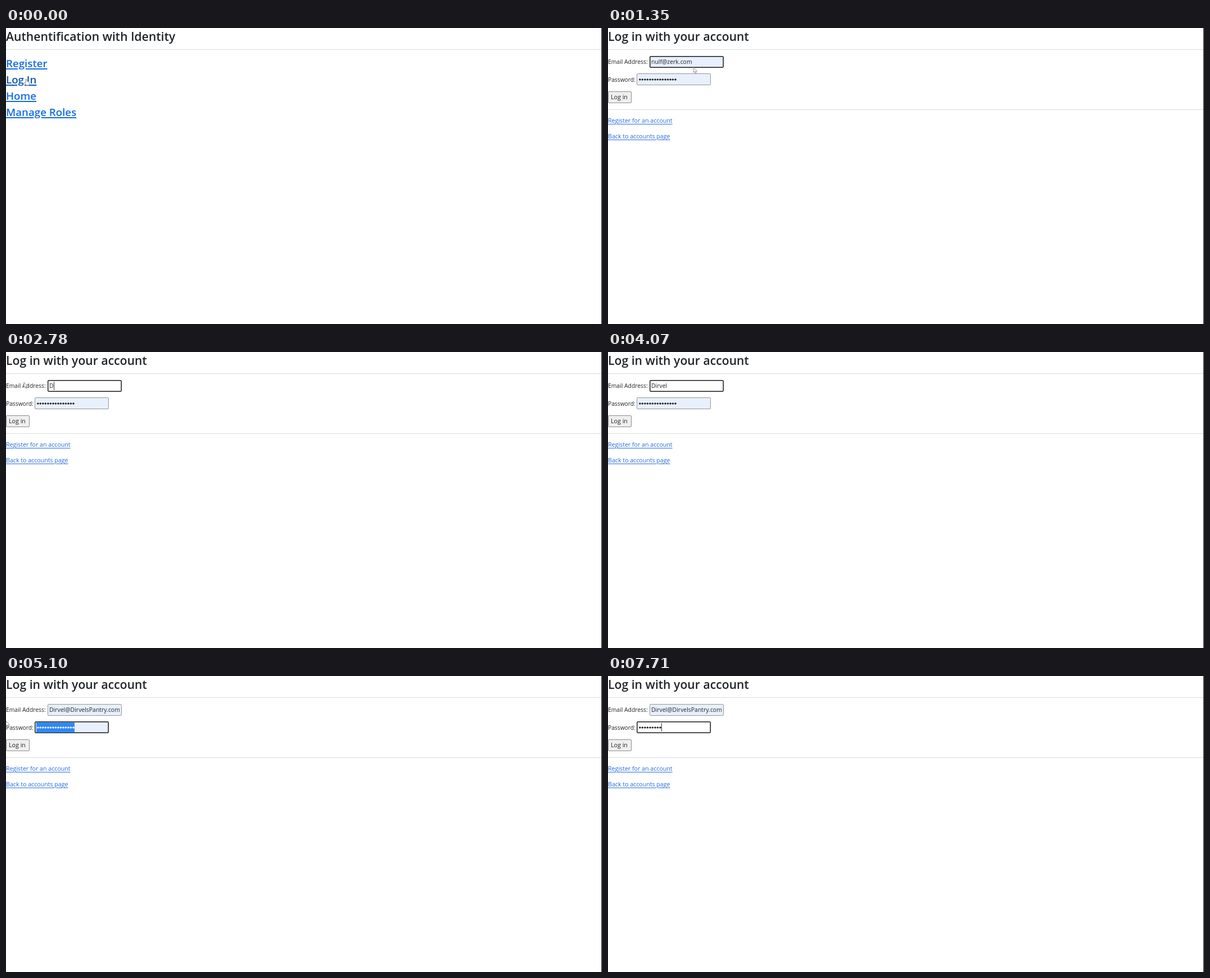
These frames come from a looping animation (1061x528 px, 8000 ms). An HTML page:

```html
<!DOCTYPE html>
<html lang="en">
<head>
<meta charset="utf-8">
<title>Log in</title>
<style>
html, body { margin: 0; width: 100%; height: 100%; overflow: hidden; background: #fff; }
#stage { position: relative; width: 1061px; height: 528px; overflow: hidden;
  font-family: "Open Sans", "Noto Sans", sans-serif; color: #212529; }
#stage * { position: absolute; box-sizing: border-box; }
.text { line-height: 17px; white-space: pre; }
.title { font-weight: 600; }
.link { color: #226bdb; text-decoration: underline 1px; text-underline-offset: 1.5px; }
.menu { color: #126be3; font-weight: 600; text-decoration: underline 1.5px; text-underline-offset: 2px; }
.hover { color: #0a56b0; }
.rule { left: 0; width: 1060px; height: 1px; background: #dadada; }
.edge { left: 1060px; top: 0; width: 1px; height: 528px; background: #000; }
.field { width: 132px; height: 21px; border: 1px solid #959595; border-radius: 2px; background: #fff; }
.field.filled { background: #e8f0fe; }
.field.focus { border-color: #181818; box-shadow: inset 0 0 0 .5px #181818; }
.button { left: 0; top: 113px; width: 42px; height: 21px; border: 1px solid #8c8c8c;
  border-radius: 2px; background: #efefef; }
#dots { left: 54px; top: 83px; height: 18px; color: #1c1c1c;
  background: radial-gradient(circle at 2.8px 9px, currentColor 1.3px, transparent 1.9px) 0 0 / 4.53px 18px; }
#email.selected, #dots.selected { color: #fff; background-color: #2f88f4; }
#caret { width: 1px; height: 15px; background: #333; }
svg { left: 0; top: 0; overflow: visible; fill: #fff; stroke: #888; stroke-width: .9; stroke-linejoin: round; }
</style>
</head>
<body>
<div id="stage">
  <div id="menu"></div>
  <div id="login">
    <div id="emailBox" class="field" style="left:74px;top:50px"></div>
    <div id="passBox" class="field" style="left:51px;top:81px"></div>
    <div class="button"></div>
    <div class="rule" style="top:145px"></div>
    <div id="dots"></div>
  </div>
  <div class="rule" style="top:38px"></div>
  <div class="edge"></div>
  <div id="caret"></div>
  <svg width="12" height="14">
    <path id="arrow" d="M0 0V9.5L2.2 7.6L3.7 11L5.2 10.4L3.8 7.1H6.6Z"/>
    <path id="hand" d="M-1 6V.6Q0-.4 1 .6V4L5 5Q6 5.5 5.6 8L5 11H0L-3.5 6.8Q-3 5.6-1 7.2Z"/>
    <path id="beam" d="M-2-5H2M0-5V5M-2 5H2"/>
  </svg>
</div>
<script>
const LOOP = 8000;
const DOT = 4.53;
const NAME = 'Dirvel';
const FULL = NAME + '@DirvelsPantry.com';
const $ = id => document.getElementById(id);

function addText(parent, x, baseline, size, value, style = '') {
  const el = document.createElement('span');
  el.className = 'text ' + style;
  el.textContent = value;
  const top = Math.ceil(baseline - 8.5 - size * .388);
  el.style.cssText = `left:${x}px;top:${top}px;font-size:${size}px`;
  $(parent).append(el);
  return el;
}

addText('menu', 0, 22, 21.2, 'Authentification with Identity', 'title');
['Register', 'Log In', 'Home', 'Manage Roles'].forEach((label, i) =>
  addText('menu', 0, 69 + 29 * i, 18.7, label, i === 1 ? 'menu hover' : 'menu'));

addText('login', 0, 22, 21.2, 'Log in with your account', 'title');
addText('login', 0, 64, 10.35, 'Email Address:');
addText('login', 0, 96, 10.25, 'Password:');
addText('login', 5, 127, 10.7, 'Log in');
addText('login', 0, 169, 10.65, 'Register for an account', 'link');
addText('login', 0, 197, 10.65, 'Back to accounts page', 'link');
const email = addText('login', 77, 64, 10.45, '');
email.id = 'email';

// Each step lists only what changes; mouse is [shape, x, y].
const steps = [
  [0, { page: 'menu', mouse: ['hand', 36, 91], email: '', dots: 0, focus: 'email', caret: false,
        emailFilled: false, passFilled: false, emailSelected: false, passSelected: false }],
  [630, { page: 'login', mouse: null, caret: true }],
  [720, { email: 'nulf@zerk.com', dots: 15, emailFilled: true, passFilled: true, caret: false }],
  [920, { mouse: ['arrow', 60, 106] }],
  [1020, { mouse: ['arrow', 85, 90] }],
  [1120, { mouse: ['arrow', 106, 80] }],
  [1200, { mouse: ['arrow', 130, 77] }],
  [1270, { mouse: ['arrow', 146, 73] }],
  [1350, { mouse: ['arrow', 152, 70] }],
  [1470, { mouse: ['beam', 152, 63] }],
  [1570, { mouse: ['beam', 149, 61] }],
  [1670, { mouse: ['beam', 147, 60] }],
  [1940, { mouse: ['beam', 100, 63] }],
  [2000, { mouse: ['arrow', 30, 76], emailSelected: true }],
  [2070, { mouse: ['arrow', 1, 84] }],
  [2780, { mouse: ['arrow', 32, 54], email: NAME[0], emailSelected: false, emailFilled: false, caret: true }],
  [2930, { mouse: null, email: NAME.slice(0, 2) }],
  ...[3, 4, 5, 6].map(n => [2930 + (n - 2) * 137.5, { email: NAME.slice(0, n) }]),
  [4000, { caret: false }],
  ...[7, 8, 9, 10].map(n => [4310 + (n - 7) * 140, { email: FULL.slice(0, n), caret: true }]),
  [4880, { email: FULL, emailFilled: true, caret: false }],
  [5020, { focus: 'pass', passSelected: true }],
  [5100, { mouse: ['arrow', 0, 80] }],
  [5930, { dots: 1, passSelected: false, passFilled: false, caret: true }],
  [6090, { dots: 2 }],
  [6250, { dots: 3 }],
  [6660, { dots: 4, mouse: null }],
  ...[5, 6, 7, 8].map(n => [6660 + (n - 4) * 225, { dots: n }]),
  [7710, { dots: 9 }]
];

const states = [];
for (const [time, change] of steps) {
  const last = states[states.length - 1];
  states.push({ ...last, ...change, time });
}

const show = (el, on) => { el.style.display = on ? '' : 'none'; };

function draw(s) {
  show($('menu'), s.page === 'menu');
  show($('login'), s.page === 'login');
  email.textContent = s.email;
  email.classList.toggle('selected', s.emailSelected);
  $('dots').style.width = s.dots * DOT + 'px';
  $('dots').classList.toggle('selected', s.passSelected);
  $('emailBox').classList.toggle('filled', s.emailFilled);
  $('passBox').classList.toggle('filled', s.passFilled);
  $('emailBox').classList.toggle('focus', s.focus === 'email');
  $('passBox').classList.toggle('focus', s.focus === 'pass');

  const inEmail = s.focus === 'email';
  const end = inEmail ? 77 + email.getBoundingClientRect().width : 54 + s.dots * DOT;
  show($('caret'), s.caret);
  $('caret').style.left = Math.round(end) + 'px';
  $('caret').style.top = (inEmail ? 53 : 84) + 'px';

  for (const shape of ['arrow', 'hand', 'beam']) {
    const on = s.mouse && s.mouse[0] === shape;
    show($(shape), on);
    if (on) $(shape).setAttribute('transform', `translate(${s.mouse[1]} ${s.mouse[2]})`);
  }
}

let current;
const start = performance.now();
function tick() {
  const t = (performance.now() - start) % LOOP;
  const state = states.filter(s => s.time <= t).pop();
  if (state !== current) draw(current = state);
  requestAnimationFrame(tick);
}
tick();
</script>
</body>
</html>
```
